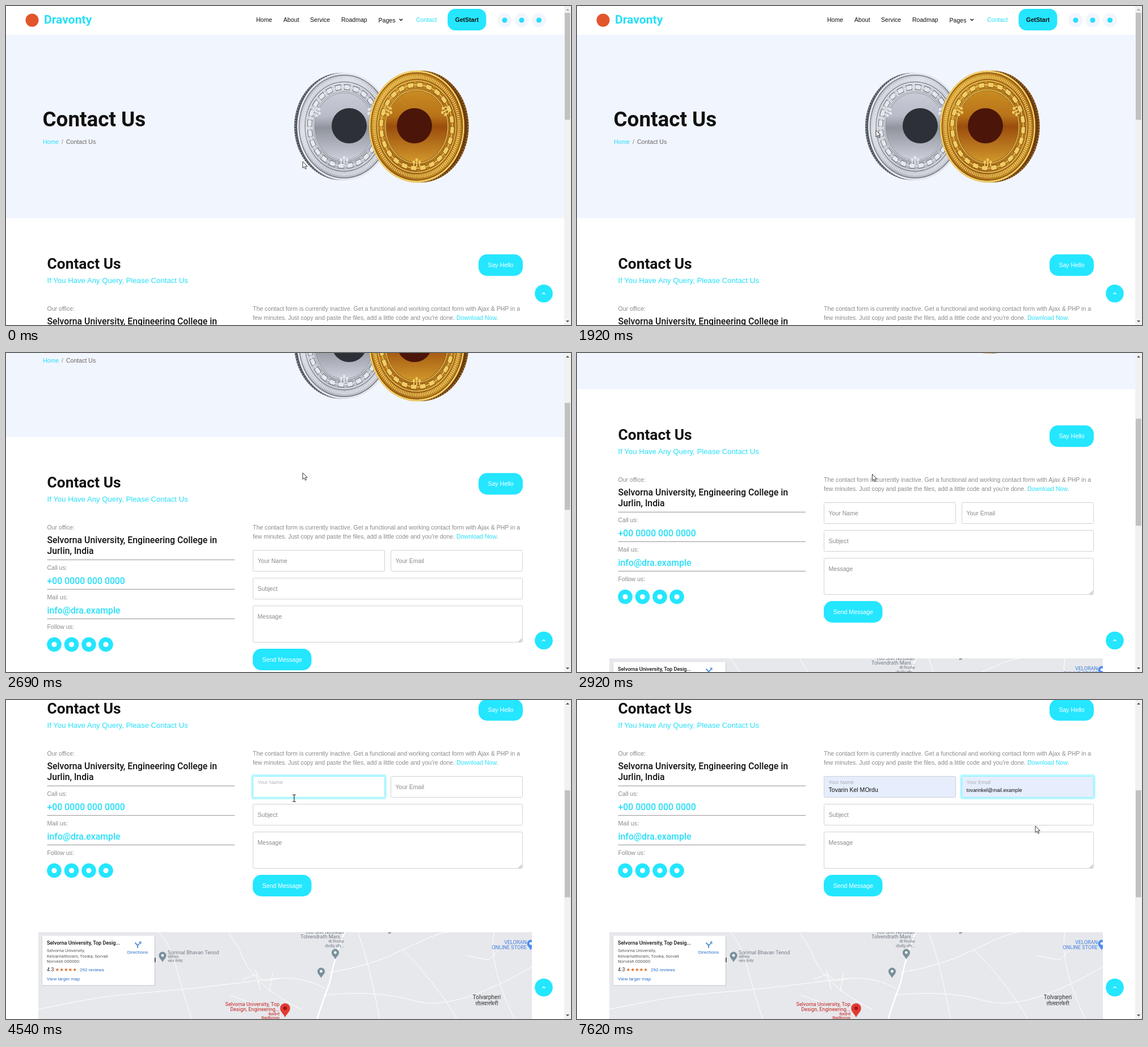
An HTML page that plays this animation: 996x562 px, repeating every 8 s.

```html
<!DOCTYPE html>
<html lang="en">
<head>
<meta charset="utf-8">
<title>Contact page</title>
<style>
  html, body { margin: 0; width: 100%; height: 100%; overflow: hidden; background: #fff; }
  svg { display: block; width: 996px; height: 562px; }
  text { font: 10.56px "Liberation Sans", Arial, sans-serif; fill: #8b8b8b; white-space: pre; }
  .h1 { font: 700 36.85px Roboto, sans-serif; fill: #111; }
  .h2 { font: 700 26.35px Roboto, sans-serif; fill: #111; }
  .h5 { font: 500 15.8px Roboto, sans-serif; fill: #111; }
  .brand { font: 700 21.1px Roboto, sans-serif; }
  .sub { font-size: 13.2px; }
  .bold { font-weight: 700; text-anchor: middle; }
  .dark { fill: #111; }
  .cyan { fill: #26dff8; }
  .on { fill: #fff; text-anchor: middle; }
  .btn { fill: #24e6ff; }
  .pale { fill: #f1f5fe; }
  .field { fill: #fff; stroke: #ced2d6; }
  .glow { fill: none; stroke: #24e6ff; stroke-opacity: .3; stroke-width: 3; }
  .rule { stroke: #a6a6a6; stroke-width: 1.4; }
  .map text { font: 9.1px Roboto, "Noto Sans", sans-serif; fill: #747d87; }
  .map .hi { font-size: 7px; font-family: "Noto Sans", sans-serif; }
  .map .small { font-size: 7.8px; fill: #5b5b5b; }
  .map .link { font-size: 8.1px; fill: #2b6fc6; }
  .map .end { text-anchor: end; }
  .map .red { fill: #c5221f; }
  .map .shop { fill: #3f7fe0; }
  .map .town { font-size: 10px; fill: #333; text-anchor: middle; }
  .map .title { fill: #111; font-weight: 500; }
  .map .stars { font: 8.6px "DejaVu Sans", sans-serif; fill: #d9702c; }
  .roads { fill: none; stroke: #fff; stroke-width: 1; }
</style>
</head>
<body>
<svg viewBox="0 0 996 562" xmlns="http://www.w3.org/2000/svg">
  <defs>
    <linearGradient id="silverFace" x2="1" y2="1">
      <stop stop-color="#a2a7b1"/><stop offset=".3" stop-color="#d9dbe2"/>
      <stop offset=".6" stop-color="#b0b4be"/><stop offset="1" stop-color="#d0d3da"/>
    </linearGradient>
    <linearGradient id="silverCore" x2="0" y2="1">
      <stop stop-color="#c9cbd6"/><stop offset=".35" stop-color="#b9bcc8"/>
      <stop offset=".52" stop-color="#8f949d"/><stop offset="1" stop-color="#cfd1dc"/>
    </linearGradient>
    <linearGradient id="goldFace" x2="1" y2="1">
      <stop stop-color="#e3b441"/><stop offset=".35" stop-color="#c0821f"/>
      <stop offset=".65" stop-color="#a96b17"/><stop offset="1" stop-color="#dca936"/>
    </linearGradient>
    <linearGradient id="goldCore" x2="0" y2="1">
      <stop stop-color="#c98d22"/><stop offset=".35" stop-color="#b87319"/>
      <stop offset=".5" stop-color="#9b4d0d"/><stop offset="1" stop-color="#d29a2c"/>
    </linearGradient>
    <clipPath id="mapBox"><path d="M57 409H927V700H57Z"/></clipPath>
    <path id="pin" d="M0 12C-2 7-6.5 5-6.5 0A6.5 6.5 0 0 1 6.5 0C6.5 5 2 7 0 12Z"/>
  </defs>

  <rect width="996" height="562" fill="#fff"/>
  <g id="page">
    <circle cx="46" cy="25" r="11.5" fill="#e2562c"/>
    <text class="brand cyan" x="67" y="31">Dravonty</text>
    <text class="dark" x="441" y="28">Home</text>
    <text class="dark" x="489" y="28">About</text>
    <text class="dark" x="536" y="28">Service</text>
    <text class="dark" x="591" y="28">Roadmap</text>
    <text class="dark" x="656.5" y="29">Pages</text>
    <text class="cyan" x="723" y="28">Contact</text>
    <path d="M693.5 22.8l2.7 2.7 2.7-2.7" fill="none" stroke="#111" stroke-width="1.3"/>
    <rect class="btn" x="778.5" y="5" width="68" height="38" rx="13.5"/>
    <text class="dark bold" x="812.5" y="28">GetStart</text>
    <g id="topSocial"></g>

    <rect class="pale" y="50.5" width="984" height="323.5"/>
    <text class="h1" x="64.5" y="211.5">Contact Us</text>
    <text class="cyan" x="65" y="243">Home</text>
    <text x="98" y="243">/</text>
    <text x="106" y="243" style="fill:#666">Contact Us</text>
    <g id="coins"></g>

    <text class="h2" x="72.5" y="462.5">Contact Us</text>
    <text class="sub cyan" x="72.5" y="488">If You Have Any Query, Please Contact Us</text>
    <rect class="btn" x="833" y="437.5" width="78" height="38" rx="15"/>
    <text class="on" x="872" y="460">Say Hello</text>

    <text x="72.5" y="537">Our office:</text>
    <text class="h5" x="72.5" y="561">Selvorna University, Engineering College in</text>
    <text class="h5" x="72.5" y="580">Jurlin, India</text>
    <text x="72.5" y="608">Call us:</text>
    <text class="h5 cyan" x="72.5" y="632.5">+00 0000 000 0000</text>
    <text x="72.5" y="660">Mail us:</text>
    <text class="h5 cyan" x="72.5" y="684.5">info@dra.example</text>
    <text x="72.5" y="711.5">Follow us:</text>
    <path class="rule" d="M72.5 590.4H403M72.5 642.4H403M72.5 694.4H403"/>
    <g id="followSocial"></g>

    <text x="435" y="537">The contact form is currently inactive. Get a functional and working contact form with Ajax &amp; PHP in a</text>
    <text x="435" y="553">few minutes. Just copy and paste the files, add a little code and you're done. <tspan class="cyan">Download Now</tspan>.</text>

    <g id="fields"></g>
    <rect class="field" x="435.5" y="622.5" width="475" height="37" rx="2"/>
    <text x="443.5" y="644.5">Subject</text>
    <rect class="field" x="435.5" y="671.5" width="475" height="64" rx="2"/>
    <text x="443.5" y="693.5">Message</text>
    <path d="M904 735l5.5-5.5M907 735l2.5-2.5" stroke="#777" stroke-width=".9"/>
    <rect class="btn" x="435" y="747" width="103.5" height="38" rx="15"/>
    <text class="on" x="487" y="769.5">Send Message</text>

    <g class="map" transform="translate(0 439)" clip-path="url(#mapBox)">
      <rect x="57" y="409" width="870" height="300" fill="#e7e8ec"/>
      <g class="roads">
        <path d="M597 409L585 440Q576 470 570 500Q560 525 546 570" stroke-width="2.6"/>
        <path d="M57 545Q150 525 200 520T330 508Q400 500 460 492T562 508"/>
        <path d="M270 409Q290 430 300 470T330 570M392 409L412 440Q430 500 520 545"/>
        <path d="M570 480Q640 470 700 440T780 409M560 520Q650 510 720 530T927 470"/>
        <path d="M700 440Q760 500 800 570M620 409Q640 460 660 570M860 409Q850 470 900 570"/>
        <path d="M417 492l25-9 12 12 26-4M440 475l8 36M470 480l-6 34M810 450l40 8 22-20M395 520l42 15"/>
      </g>
      <text class="end" x="596" y="411.5">100 Shri Nirlokan</text>
      <text class="end" x="596" y="420">Tolvendrath Mani...</text>
      <text class="hi end" x="596" y="428">श्री निरलोक</text>
      <text class="hi end" x="596" y="436">तोलवेंद्र मणि...</text>
      <text class="hi town" x="669" y="409">तोलनूर</text>
      <text x="285" y="447.5">Sorimal Bhavan Tenod</text>
      <text class="hi" x="285" y="454.5">सोरिमल</text>
      <text class="hi" x="285" y="461.5">भवन तेनोद</text>
      <text class="end shop" x="918" y="429.5">VELORAN</text>
      <text class="end shop" x="918" y="438.5">ONLINE STORE</text>
      <text class="town" x="847.5" y="527">Tolvarpheri</text>
      <text class="town" x="847.5" y="537.5">तोलवारफेरी</text>
      <text class="end red" x="482" y="538.5">Selvorna University, Top</text>
      <text class="end red" x="482" y="548">Design, Engineering...</text>
      <text class="hi end red" x="482" y="555.5">सेलवोर्ना</text>
      <text class="hi end red" x="482" y="562.5">विश्वविद्यालय</text>
      <g id="pins"></g>
      <path d="M262 454h1.5v8h-1.5Z" fill="#333"/>
      <rect x="63.5" y="416.5" width="199.5" height="87" rx="1.5" fill="#000" opacity=".16"/>
      <rect x="64" y="415.5" width="198" height="87" rx="1" fill="#fff"/>
      <text class="title" x="72" y="431">Selvorna University, Top Desig...</text>
      <text class="small" x="72" y="444">Selvorna University,</text>
      <text class="small" x="72" y="453.5">Kelvarnathoram, Tovika, Sorvali</text>
      <text class="small" x="72" y="463">Norvesh 000000</text>
      <text x="72" y="478" style="fill:#333">4.3</text>
      <text class="stars" x="86.5" y="478">★★★★★</text>
      <text class="link" x="130" y="478">292 reviews</text>
      <text class="link" x="72" y="494">View larger map</text>
      <text class="link" x="232" y="447" text-anchor="middle">Directions</text>
      <path d="M232 437v-4.5l-4.5-5M232 432.5l4.5-4.5" fill="none" stroke="#5b93dc" stroke-width="2"/>
      <path d="M234 425.5h4.5v4.5Z" fill="#5b93dc"/>
    </g>
  </g>

  <circle class="btn" cx="948" cy="506.5" r="15.8"/>
  <path d="M945.4 507.8l2.6-2.6 2.6 2.6" fill="none" stroke="#fff" stroke-width="1.3"/>

  <rect x="984" width="12" height="562" fill="#f1f1f1"/>
  <rect id="thumb" x="985" y="12" width="9.5" height="188.5" fill="#c1c1c1"/>
  <path id="upArrow" d="M987 8l3-3.2 3 3.2Z"/>
  <path d="M987 554l3 3.2 3-3.2Z" fill="#505050"/>

  <g id="cursor">
    <path id="arrow" d="M0 0V11.5L2.7 9 4.6 13.2 6.5 12.4 4.7 8.3H8.2Z" fill="#fff" stroke="#222" stroke-width=".9"/>
    <path id="beam" d="M-3-6H-.7L0-5.3.7-6H3M0-5.3V5.3M-3 6H-.7L0 5.3.7 6H3" fill="none" stroke="#222" stroke-width="1.1"/>
  </g>
</svg>

<script>
const LOOP = 8000;
const $ = id => document.getElementById(id);

function add(parent, tag, attrs, content = '') {
  const node = document.createElementNS('http://www.w3.org/2000/svg', tag);
  for (const key in attrs) node.setAttribute(key, attrs[key]);
  node.textContent = content;
  return parent.appendChild(node);
}
const show = (node, on) => node.setAttribute('visibility', on ? 'visible' : 'hidden');
const within = (spans, t) => spans.some(([from, to]) => t >= from && t < to);

// Linear interpolation through rows of [time, value, ...]
function track(rows, t) {
  const i = rows.findIndex(row => row[0] > t);
  if (i < 0) return rows[rows.length - 1].slice(1);
  if (i === 0) return rows[0].slice(1);
  const a = rows[i - 1], b = rows[i], k = (t - a[0]) / (b[0] - a[0]);
  return a.slice(1).map((v, j) => v + (b[j + 1] - v) * k);
}

for (const x of [879, 909, 939.5]) {
  add($('topSocial'), 'circle', { class: 'pale', cx: x, cy: 25, r: 12.5 });
  add($('topSocial'), 'circle', { class: 'cyan', cx: x, cy: 25, r: 4.6 });
}
for (const x of [85, 115.5, 146, 176]) {
  add($('followSocial'), 'circle', { class: 'btn', cx: x, cy: 739.5, r: 12.8 });
  add($('followSocial'), 'circle', { cx: x, cy: 739.5, r: 4.6, fill: '#fff' });
}
for (const [x, y, color, dot, size] of [
  [276, 450, '#78909c', '#fff', 1], [580.5, 445, '#78909c', '#fff', 1],
  [555.5, 478, '#78909c', '#fff', 1], [925, 429, '#4f8df0', '#fff', 1],
  [492, 543, '#e23b32', '#a31512', 1.35]]) {
  const pin = add($('pins'), 'g', { transform: `translate(${x} ${y}) scale(${size})` });
  add(pin, 'use', { href: '#pin', fill: color });
  add(pin, 'circle', { r: 2.4, fill: dot });
}

function coin({ x, squeeze, R, depth, face, core, edge, light, line, mark, markX }) {
  const g = add($('coins'), 'g', { transform: `translate(${x} 212.3) scale(${squeeze} 1)` });
  const ring = (r, width, stroke, dash, extra) => add(g, 'circle',
    { r, fill: 'none', stroke, 'stroke-width': width, pathLength: 360, 'stroke-dasharray': dash || 'none', ...extra });
  add(g, 'circle', { cx: depth, r: R, fill: edge });
  ring(R - 1.5, 3, light, '1 2', { cx: depth, opacity: .5 });
  add(g, 'circle', { r: R, fill: `url(#${face})` });
  ring(R - 1.5, 3, light);
  ring(R - 4, 1.5, line);
  ring(R - 11, 6, light, '1.2 1.2');
  ring(R - 16, 1.2, line);
  ring(R - 17.5, 1.3, light);
  ring(R - 25, 10, line, '10 5');
  ring(R - 25, 7.5, light, '8.6 6.4', { 'stroke-dashoffset': -.7 });
  ring(R - 25, 1.5, light);
  add(g, 'circle', { r: R - 34, fill: `url(#${core})`, stroke: line, 'stroke-width': 3 });
  ring(R - 34, 1.5, light);
  for (const a of [90, 205, 335]) {
    const node = add(g, 'g', { transform: `rotate(${a}) translate(${R - 36} 0)` });
    add(node, 'path', { d: 'M-3 0H9M0-6H8M0 6H8', stroke: light, 'stroke-width': 2.2 });
    for (const y of [-6, 0, 6]) add(node, 'circle', { cx: y ? 0 : -4, cy: y, r: 2.6, fill: light });
  }
  add($('coins'), 'circle', { cx: markX, cy: 211, r: 31, fill: mark });
}
coin({ x: 596, squeeze: .875, R: 94.5, depth: -6, face: 'silverFace', core: 'silverCore',
  edge: '#50545d', light: '#e6e8ee', line: '#71757e', mark: '#2d3036', markX: 605 });
coin({ x: 724, squeeze: .853, R: 98.5, depth: 9, face: 'goldFace', core: 'goldCore',
  edge: '#6d3c0e', light: '#f1cd66', line: '#84500f', mark: '#4b1509', markX: 720 });

function makeField(x, label, value) {
  const g = $('fields');
  return {
    x,
    glow: add(g, 'rect', { class: 'glow', x: x - 1.5, y: 571.5, width: 236, height: 41, rx: 3 }),
    box: add(g, 'rect', { class: 'field', x: x + .5, y: 573.5, width: 232, height: 37, rx: 2 }),
    label: add(g, 'text', {}, label),
    value: add(g, 'text', { class: 'dark', x: x + 8.5, y: 601 }, value),
    caret: add(g, 'path', { d: `M${x + 9.5} 591v12`, stroke: '#555', 'stroke-width': .8 }),
  };
}
const nameField = makeField(435, 'Your Name', 'Tovarin Kel MOrdu');
const mailField = makeField(678, 'Your Email', 'tovarinkel@mail.example');

function drawField(f, t, { focus, blur, fill, commit, caret }) {
  const active = t >= focus && t < blur;
  const k = Math.min(1, Math.max(0, (t - focus) / 100));
  const ease = k * (2 - k);
  show(f.glow, active);
  f.box.style.stroke = active ? '#86f1ff' : '';
  f.box.style.fill = t >= fill ? '#e6eefd' : '';
  f.label.setAttribute('transform', `translate(${f.x + 8.5} ${596 - 9 * ease}) scale(${1 - .15 * ease})`);
  f.label.setAttribute('opacity', 1 - .35 * ease);
  show(f.value, t >= fill);
  f.value.style.fontSize = t >= commit ? '10.56px' : '8.78px';
  show(f.caret, within(caret, t));
}

const scrollRows = [[1990, 0], [2080, 14], [2690, 226], [3230, 422], [3370, 439]];
const cursorRows = [
  [80, 523, 274], [1690, 527, 219], [1920, 527, 219], [2690, 523, 211],
  [3060, 519, 215], [3230, 518, 216], [3460, 518, 216], [4230, 508, 173], [4540, 508, 173],
  [4770, 515, 188], [4920, 520, 193], [5080, 522, 194], [5850, 692, 162],
  [5920, 693, 160.5], [6150, 693, 160.5], [6380, 736, 181], [6540, 765, 202],
  [6920, 806, 220], [7080, 808, 222]];
const beamSpans = [[3060, 4700], [5800, 6230]];

function draw(now) {
  const t = now % LOOP;
  const [scroll] = track(scrollRows, t);
  $('page').setAttribute('transform', `translate(0 ${-Math.round(scroll)})`);
  $('thumb').setAttribute('y', 12 + scroll * .335);
  $('upArrow').setAttribute('fill', scroll ? '#505050' : '#a3a3a3');

  drawField(nameField, t, { focus: 4310, blur: 6080, fill: 4770, commit: 5080, caret: [] });
  drawField(mailField, t, { focus: 6080, blur: LOOP, fill: 6500, commit: LOOP,
    caret: [[6080, 6600], [7080, 7620]] });

  const [x, y] = track(cursorRows, t);
  const beam = within(beamSpans, t);
  $('cursor').setAttribute('transform', `translate(${x} ${y})`);
  show($('beam'), beam);
  show($('arrow'), !beam);
  requestAnimationFrame(() => draw(performance.now()));
}
draw(performance.now());
</script>
</body>
</html>
```
